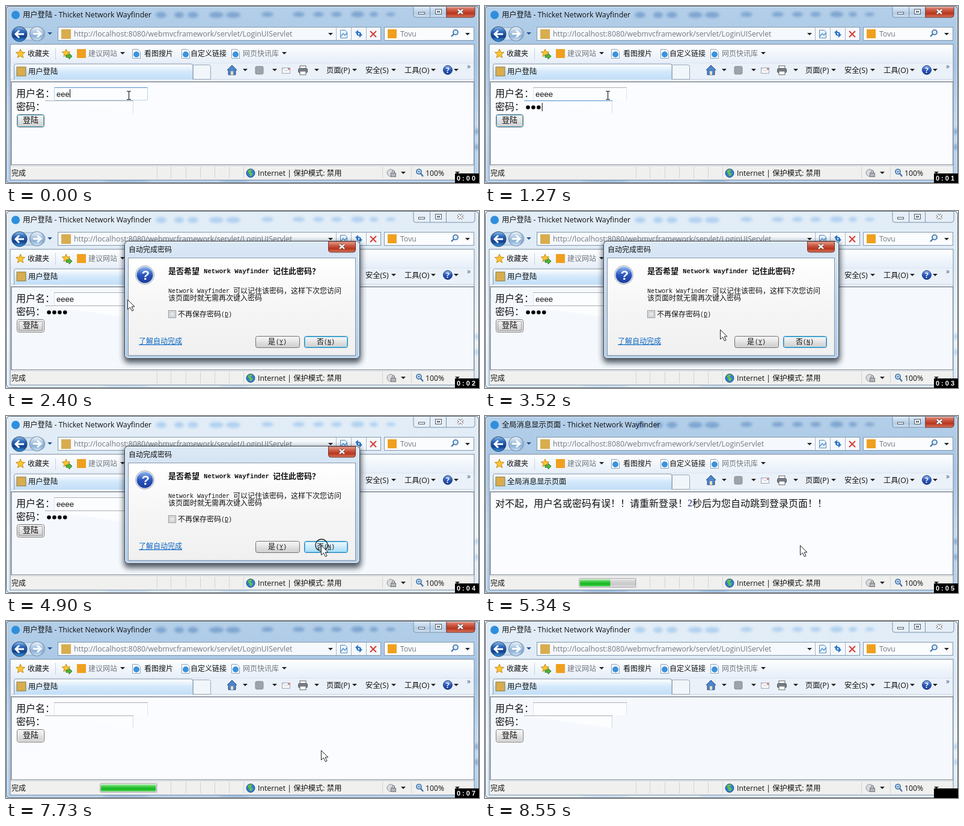
Animation of 787x296 px, one loop 8.59 s. Source, as an HTML page:

```html
<!DOCTYPE html>
<html lang="zh-CN">
<head>
<meta charset="utf-8">
<title>用户登陆</title>
<style>
html, body { margin: 0; width: 100%; height: 100%; overflow: hidden; background: #c4d8ec; }
svg { display: block; width: 787px; height: 296px; }
text { font: 12.3px "Open Sans", "Noto Sans CJK SC", sans-serif; fill: #111; white-space: pre; }
.cjk { font: 12px "Noto Sans CJK SC", sans-serif; }
.page { font: 16px "Noto Sans CJK SC", sans-serif; }
.input { font: 13px "Liberation Sans", sans-serif; }
.mono { font: 10px "Liberation Mono", monospace; }
.bold { font-weight: bold; }
.dim { fill: #737880; }
.clock { font: bold 11px "Liberation Sans", sans-serif; letter-spacing: 3px; fill: #fff; }
</style>
</head>
<body>
<svg id="stage" viewBox="0 0 787 296" xmlns="http://www.w3.org/2000/svg"></svg>
<script>
const LOOP = 8590;
const stage = document.getElementById('stage');

// Drawing helpers
const rect = (x, y, w, h, fill, stroke = 'none', r = 0, extra = '') =>
  `<rect x="${x}" y="${y}" width="${w}" height="${h}" rx="${r}" fill="${fill}" stroke="${stroke}" ${extra}/>`;
const circle = (x, y, r, fill, stroke = 'none', extra = '') =>
  `<circle cx="${x}" cy="${y}" r="${r}" fill="${fill}" stroke="${stroke}" ${extra}/>`;
const path = (d, fill, stroke = 'none', extra = '') => `<path d="${d}" fill="${fill}" stroke="${stroke}" ${extra}/>`;
const line = (d, stroke, w = 1) => path(d, 'none', stroke, `stroke-width="${w}"`);
const text = (x, y, s, cls = '', extra = '') => `<text x="${x}" y="${y}" class="${cls}" ${extra}>${s}</text>`;
const group = (id, body, extra = '') => `<g id="${id}" ${extra}>${body}</g>`;
const grad = (id, ...colors) => `<linearGradient id="${id}" x2="0" y2="1">` +
  colors.map((c, i) => `<stop offset="${i / (colors.length - 1)}" stop-color="${c}"/>`).join('') + '</linearGradient>';
const arrow = (x, y, fill = '#222') => path(`M${x - 4} ${y - 2}h8l-4 4z`, fill);
const star = (cx, cy, r) => {
  let d = '';
  for (let i = 0; i < 10; i++) {
    const a = i * Math.PI / 5 - Math.PI / 2, q = i % 2 ? r * .45 : r;
    d += (i ? 'L' : 'M') + (cx + q * Math.cos(a)).toFixed(1) + ' ' + (cy + q * Math.sin(a)).toFixed(1);
  }
  return path(d + 'z', '#fcc52f', '#c98a14');
};
const lens = (x, y) => circle(x, y, 4, '#d8ecfb', '#3c6ea8', 'stroke-width="1.7"') + line(`M${x - 3} ${y + 3}l-4 4`, '#3c6ea8', 2.2);
const blobs = (list, fill) => list.map(([x, y, rx, ry]) =>
  `<ellipse cx="${x}" cy="${y}" rx="${rx}" ry="${ry}" fill="${fill}" filter="url(#soft)"/>`).join('');

const defs = `<defs>
  ${grad('glassOn', '#b4cfe9', '#a6c6e5', '#c3dbf1', '#b3d0ec')}
  ${grad('glassOff', '#e2edf7', '#dfebf6', '#edf5fc', '#dcebf8')}
  ${grad('bar', '#fdfeff', '#f1f6fc', '#e6eef8')}
  ${grad('tab', '#ffffff', '#d3e8fb', '#c2def7')}
  ${grad('back', '#8fbdec', '#2c68b8', '#123f8c', '#3e9be0')}
  ${grad('fore', '#eef5fb', '#b5cde6', '#8eb2d6', '#cfe4f6')}
  ${grad('close', '#e9a596', '#cf5f49', '#b8341d', '#d9795c')}
  ${grad('cap', '#e3eef8', '#c9dcee', '#b4cde5', '#cfe1f2')}
  ${grad('button', '#f5f5f5', '#ebebeb', '#dadada', '#cfcfcf')}
  ${grad('hot', '#f0f9fe', '#dcf0fb', '#bee6fb', '#a9d9f5')}
  ${grad('green', '#b6eeb4', '#3fca45', '#14b51f', '#55d75a')}
  ${grad('groove', '#efefef', '#d5d5d5', '#c9c9c9', '#e2e2e2')}
  ${grad('ball', '#8db4f0', '#2a56bd', '#1b3c9b')}
  ${grad('frame', '#dce9f6', '#c3d8ee', '#b4cee9')}
  ${grad('sheet', '#ffffff', '#f6f6f6', '#f0f0f0')}
  <filter id="soft" x="-50%" y="-80%" width="200%" height="260%"><feGaussianBlur stdDeviation="2"/></filter>
  <filter id="shade" x="-10%" y="-15%" width="120%" height="130%"><feGaussianBlur stdDeviation="5"/></filter>
</defs>`;

function glass() {
  const row = [[258, 15, 9, 5], [288, 15, 8, 5], [311, 15, 9, 5], [350, 15, 12, 5], [378, 15, 12, 5],
    [435, 14, 10, 4], [487, 14, 10, 4], [520, 14, 9, 4], [550, 14, 9, 4], [585, 14, 11, 5], [612, 14, 7, 4], [640, 14, 8, 3]];
  const rim = [[784, 210, 4, 5], [784, 236, 4, 5], [200, 294, 40, 2], [380, 294, 25, 2]];
  const caps = fill => path('M678 0v15q0 4 4 4h94q4 0 4-4V0z', fill, '#7890a8') + line('M705.5 0v19M732.5 0v19', '#7890a8');
  return group('active', rect(0, 0, 787, 296, 'url(#glassOn)') + blobs(row.concat(rim), '#7fa6d0') + caps('url(#cap)') +
      path('M733 0h47v15q0 4-4 4h-43z', 'url(#close)', '#7a3a34')) +
    group('idle', rect(0, 0, 787, 296, 'url(#glassOff)') + blobs(row.concat(rim), '#b2d2f0') + caps('#e6eff8')) +
    rect(.5, .5, 786, 295, 'none', '#4d5c6c', 6) + rect(1.5, 1.5, 784, 293, 'none', '#ffffff', 5, 'opacity=".55"') +
    rect(686.5, 10.5, 10, 3, '#fff', '#4e5a68') +
    rect(714.5, 5.5, 10, 8, '#fff', '#4e5a68') + rect(717.5, 8.5, 4, 2, '#c9d8e6', '#4e5a68') +
    line('M752 6l8 7M760 6l-8 7', '#4a4a55', 4) + line('M752 6l8 7M760 6l-8 7', '#fff', 2.4);
}

function addressRow() {
  const head = circle(16, 15, 7, '#2f8fdc');
  const nav = rect(9, 36, 56, 21, '#cfe0f0', '#8ba6c2', 10) +
    circle(22.5, 47, 12.5, 'url(#back)', '#28496f') + line('M30 47H17M22 41l-6 6 6 6', '#fff', 3) +
    circle(51.5, 46.5, 12, 'url(#fore)', '#6884a3') + line('M45 46.5h12M52 41l6 5.5-6 5.5', '#f8fcff', 3) + arrow(73, 46, '#24508c');
  const field = rect(86.5, 35.5, 537, 22, '#f5f9fd', '#8397ab') + line('M549.5 36v21M574.5 36v21M599.5 36v21', '#a7b7c7') +
    rect(92, 39, 16, 16, '#d8ad4e') + arrow(540, 47);
  const icons = path('M556.5 40.5h8l3 3v10h-11z', '#e9f4fd', '#5a88b8') + line('M557 51l4-5 3 3 3-4', '#4a90cf', 1.4) +
    path('M581 44l5-4v3q5 0 5 4h-2q0-2-3-2v3zM593 48l-5 5v-3q-5 0-5-4h2q0 2 3 2v-3z', '#2f78c8') +
    line('M606 42l10 10M616 42l-10 10', '#d8413a', 2.2);
  const search = rect(629.5, 35.5, 149, 22, '#fafcfe', '#8397ab') + rect(635, 39, 15, 15, '#f0a01e') +
    text(656, 51, 'Tovu', 'dim', 'font-style="italic"') + lens(748, 44) + arrow(768, 47);
  return head + text(28, 19, '', '', 'id="title"') + nav + field + text(113, 51, '', 'dim', 'id="url"') + icons + search;
}

function toolbars() {
  const favs = star(24, 80, 8) + text(36, 84, '收藏夹', 'cjk') + line('M82.5 70v20', '#c6d2df') +
    star(100, 79, 7) + path('M100 82h5v-3l5 5-5 5v-3h-5z', '#52b53e', '#2f7d27') +
    rect(118, 72, 15, 15, '#f0a01e') + text(137, 84, '建议网站', 'cjk dim') + arrow(194, 79) +
    [[217, 230, '看图搜片', ''], [299, 307, '自定义链接', ''], [382, 394, '网页快讯库', 'dim']].map(([x, tx, s, c]) =>
      path(`M${x - 6.5} 72.5h9l4 4v11h-13z`, '#fff', '#8ea0b4') + circle(x, 81, 5, '#3b93dd') + text(tx, 84, s, 'cjk ' + c)).join('') +
    arrow(463, 79);
  const tab = path('M13.5 123V100q0-3 3-3H308q3 0 3 3v23', 'url(#tab)', '#8496a8') + rect(18, 102, 15, 15, '#d8ad4e', '#8a7a4a') +
    text(37, 114, '', '', 'id="tabName"') + path('M311.5 122.5V98.5h26q3 0 3 3v21z', '#f1f6fb', '#97a6b6');
  const tools = path('M368 107l8-8 8 8h-2v8h-12v-8z', '#4c86c9', '#274f86') + rect(374, 109, 4, 6, '#f3dfb2') +
    rect(415, 101, 13, 13, '#9da3a9', '#858b92', 2) +
    rect(459.5, 103.5, 13, 9, '#fdfdfd', '#9ba3ad') + line('M460 104l6 5 6-5', '#b5bcc4') + rect(469, 104, 3, 3, '#d98a8a') +
    rect(489, 100, 10, 5, '#f5f5f5', '#666') + rect(486.5, 104.5, 15, 7, '#787f88', '#4b5159', 2) + rect(489, 109, 10, 6, '#fff', '#666') +
    [[533, '页面(P)'], [598, '安全(S)'], [663, '工具(O)']].map(([x, s]) => text(x, 112, s)).join('') +
    [398, 447, 517, 580, 645, 711, 749].map(x => arrow(x, 107)).join('') +
    circle(735, 107, 7.5, 'url(#ball)', '#20417c') + text(732, 112, '?', 'bold', 'style="fill:#fff"') +
    text(767, 105, '»', '', 'style="fill:#3a5575"');
  return rect(7, 64, 772, 227, '#f2f6fb', '#7b8a9b', 0) + rect(8, 65, 770, 31, 'url(#bar)') +
    rect(8, 96, 770, 29, '#ebf1f9') + line('M8 95.5H778', '#dbe5f0') + line('M8 122.5H14M340 122.5H778', '#c9d7e6') + favs + tab + tools;
}

function statusBar() {
  const seps = [251, 274, 299, 323, 347, 371, 395, 626, 674];
  return rect(8, 267, 770, 23, '#f0f0ef') + line('M8 267.5H778', '#d2d6db') +
    seps.map(x => line(`M${x + .5} 269v19`, '#cfd3d7')).join('') + text(9, 284, '完成', 'cjk') +
    group('progress', rect(156.5, 271.5, 94, 15, 'url(#groove)', '#a9a9a9', 2) + rect(158, 273, 50, 12, 'url(#green)', 'none', 1, 'id="fill"')) +
    circle(407, 279.5, 7, '#2f7fd0', '#1d4d88') + path('M402 276q4-5 8-2l-3 4 4 2-3 5q-3-1-3-4z', '#67bd52') +
    text(419, 284, 'Internet | 保护模式: 禁用') +
    circle(640, 279, 6, '#d8dadd', '#8e949b') + rect(640.5, 279.5, 8, 6, '#b0b5bb', '#777') + line('M642.5 279v-3q2-2 4 0v3', '#777') + arrow(661, 279) +
    circle(687, 277, 4, '#d8ecfb', '#3c6ea8', 'stroke-width="1.7"') + line('M690 280l4 5', '#3c6ea8', 2.2) + line('M685 277h4M687 275v4', '#3c6ea8') +
    text(698, 284, '100%') + arrow(751, 279);
}

function pages() {
  const login = text(17, 152, '用户名：', 'page') + text(17, 174, '密码：', 'page') +
    path('M80.5 158V136.5H235.5V157.5', '#fcfdff', '#dfe4eb') + line('M80 136.5H236', '#abadb3') +
    group('userFocus', rect(80.5, 136.5, 155, 21, 'none', '#b7d5ec', 1) + line('M81 136.5h154', '#4f8fcb')) +
    path('M65 158.5H211.5V179', '#fcfdff', '#d3d8de') + line('M65 158.5h147', '#abadb3') +
    group('passFocus', line('M65 158.5h147', '#4f8fcb')) +
    text(84, 152, '', 'input', 'id="user"') + [0, 1, 2, 3].map(i => circle(71.5 + i * 8.9, 169.5, 3.3, '#000', 'none', `id="dot${i}"`)).join('') +
    rect(0, 0, 1, 14, '#000', 'none', 0, 'id="caret"') +
    rect(18.5, 181.5, 45, 21, 'url(#button)', '#707070', 3) + rect(19.5, 182.5, 43, 19, 'none', '#fff', 2, 'opacity=".8"') +
    rect(19.5, 182.5, 43, 19, 'none', '#58b8dc', 2, 'id="glow"') +
    rect(21.5, 184.5, 39, 15, 'none', '#555', 0, 'id="ring" stroke-dasharray="1 1"') +
    text(28, 195, '登陆', 'cjk', 'style="font-size:13px"');
  const notice = text(17, 152, '对不起，用户名或密码有误！！请重新登录！', 'page') +
    text(337, 151, '2', '', 'style="font:16px \'Liberation Serif\',serif;fill:#1d2c70"') + text(345, 152, '秒后为您自动跳到登录页面！！', 'page');
  return rect(8.5, 126.5, 770, 139, '#fbfcff', '#7d8590', 0, 'id="sheetBox"') + line('M9.5 265V127.5H778', '#b9bfc6') +
    group('login', login) + group('notice', notice);
}

function dialog() {
  const key = s => `(<tspan text-decoration="underline">${s}</tspan>)`;
  return rect(196, 52, 395, 202, '#1c2733', 'none', 8, 'filter="url(#shade)" opacity=".75"') +
    rect(197.5, 50.5, 391, 196, 'url(#frame)', '#36424f', 6) + rect(198.5, 51.5, 389, 194, 'none', '#fff', 5, 'opacity=".7"') +
    text(204, 69, '自动完成密码', 'cjk') + path('M536.5 51v14q0 4 4 4h37q4 0 4-4V51z', 'url(#close)', '#6d3430') +
    line('M555 56l8 7M563 56l-8 7', '#51352f', 4) + line('M555 56l8 7M563 56l-8 7', '#fff', 2.4) +
    rect(203.5, 78.5, 378, 163, 'url(#sheet)', '#8495a8') +
    circle(231, 107, 15.5, '#e4e8ee', '#a3abb5') + circle(231, 107, 13.5, 'url(#ball)') +
    text(225.5, 115, '?', '', 'style="font:bold 22px \'Liberation Sans\',sans-serif;fill:#fff"') +
    text(270, 105, '是否希望', 'cjk bold', 'style="font-size:13px"') + text(329, 104, 'Network Wayfinder', 'mono bold', 'style="font-size:10.7px"') +
    text(444, 105, '记住此密码？', 'cjk bold', 'style="font-size:13px"') +
    text(270, 137, 'Network Wayfinder', 'mono') + text(378, 138, '可以记住该密码，这样下次您访问', 'cjk') + text(270, 150, '该页面时就无需再次键入密码', 'cjk') +
    rect(270.5, 166.5, 12, 12, '#f4f4f4', '#8e8f8f') + rect(272.5, 168.5, 8, 8, '#e3e6e9', '#b5babf') +
    text(286, 177, '不再保存密码', 'cjk') + text(358, 176, key('D'), 'mono') +
    text(221, 222, '了解自动完成', 'cjk', 'style="fill:#0b66c3" text-decoration="underline"') +
    rect(415.5, 209.5, 73, 19, 'url(#button)', '#707070', 3) + text(436, 223, '是', 'cjk') + text(449, 222, key('Y'), 'mono') +
    rect(496.5, 209.5, 72, 19, 'url(#button)', '#3c7fb1', 3, 'id="noKey"') + rect(497.5, 210.5, 70, 17, 'none', '#47c4ef', 2) +
    text(517, 223, '否', 'cjk') + text(529, 222, key('N'), 'mono');
}

const overlay = group('beam', line('M201 142.5h2.5l1 1 1-1h2.5M204.5 143v13M201 156.5h2.5l1-1 1 1h2.5', '#222', 1.2)) +
  group('pointer', circle(1, 0, 10, 'none', '#222', 'id="click" stroke-width="1.3"') +
    path('M.5 .5v16l4-3.6 3 6.2 2.6-1.2-2.9-6H12z', '#fff', '#222')) +
  rect(747, 280, 40, 16, '#000') + text(750, 292, '', 'clock', 'id="clock"');

stage.innerHTML = defs + glass() + addressRow() + toolbars() + pages() + statusBar() + group('dialog', dialog()) + overlay;

const $ = id => document.getElementById(id);
const show = (id, on) => $(id).setAttribute('display', on ? 'inline' : 'none');
const put = (id, s) => { if ($(id).textContent !== s) $(id).textContent = s; };
const set = (id, attrs) => { for (const k in attrs) $(id).setAttribute(k, attrs[k]); };

// The picture changes in bursts: first time, last time, count
const bursts = [[0, 0, 1], [150, 150, 1], [560, 560, 1], [840, 1550, 6], [1960, 2120, 2], [2270, 2400, 2], [2960, 3520, 5],
  [3680, 3960, 3], [4060, 4490, 4], [4900, 5620, 6], [5900, 6050, 2], [7020, 8010, 8], [8550, 8550, 1]];
const steps = bursts.flatMap(([a, b, n]) => Array.from({ length: n }, (_, i) => Math.floor(a + (n > 1 ? (b - a) * i / (n - 1) : 0))));

function along(points, t) {
  let p = points[0];
  for (const q of points) {
    if (t < q[0]) {
      const k = Math.max(0, (t - p[0]) / (q[0] - p[0] || 1));
      return p.slice(1).map((v, i) => v + (q[i + 1] - v) * k);
    }
    p = q;
  }
  return p.slice(1);
}

const mouse = [[2820, 202, 148], [3520, 391, 198], [3960, 510, 214], [4490, 524, 216]];
const popup = [[1800, .88, 0], [2120, .94, .52], [2270, .98, .85], [2400, 1, 1], [4900, 1, 1], [5180, .9, 0]];

function draw(time) {
  const t = steps.filter(s => s <= time).pop();
  const last = t >= 8550, notice = t >= 5180 && t < 7300, fresh = t >= 7300;
  const idle = last || (t >= 1960 && t < 5040);

  show('active', !idle);
  show('idle', idle);
  set('sheetBox', { fill: idle ? '#f5f9fe' : notice && t >= 5900 ? '#fefeff' : '#fbfcff' });
  const name = notice ? '全局消息显示页面' : '用户登陆';
  put('title', name + ' - Thicket Network Wayfinder');
  put('tabName', name);
  put('url', 'http://localhost:8080/webmvcframework/servlet/' + (notice ? 'LoginServlet' : 'LoginUIServlet'));

  show('login', !notice);
  show('notice', notice);
  const typed = fresh ? 0 : t < 150 ? 3 : 4;
  const dots = fresh ? 0 : [840, 980, 1260, 1400].filter(s => t >= s).length;
  put('user', 'e'.repeat(typed));
  for (let i = 0; i < 4; i++) show('dot' + i, i < dots);
  show('userFocus', t < 560);
  show('passFocus', t >= 560 && t < 1960);
  show('ring', t >= 1960 && !fresh);
  show('glow', t < 1960);
  show('caret', t < 1960);
  set('caret', t < 560 ? { x: 84 + typed * 7.2 + .4, y: 139 } : { x: 68 + dots * 8.9, y: 162 });

  const began = notice ? 5180 : 7300;
  show('progress', (t >= 5180 && t < 5900) || (fresh && t < 7860));
  set('fill', { width: Math.max(0, Math.min(91, 14 + (t - began) * .24)) });

  const [scale, alpha] = along(popup, t);
  show('dialog', t >= 1960 && alpha > 0);
  set('dialog', { opacity: alpha, transform: scale === 1 ? '' : `translate(392.5 147) scale(${scale}) translate(-392.5 -148)` });

  const [mx, my] = along(mouse, t);
  set('noKey', { fill: mx > 496 && t >= 2960 ? 'url(#hot)' : 'url(#button)' });
  show('beam', t < 1960);
  show('pointer', t >= 1960 && !last);
  set('pointer', { transform: `translate(${Math.round(mx)} ${Math.round(my)})` });
  show('click', t >= 4900 && t < 5040);
  put('clock', last ? '' : '0:0' + Math.floor(t / 1000));
}

const start = performance.now();
function tick() {
  draw((performance.now() - start) % LOOP);
  requestAnimationFrame(tick);
}
tick();
</script>
</body>
</html>
```
